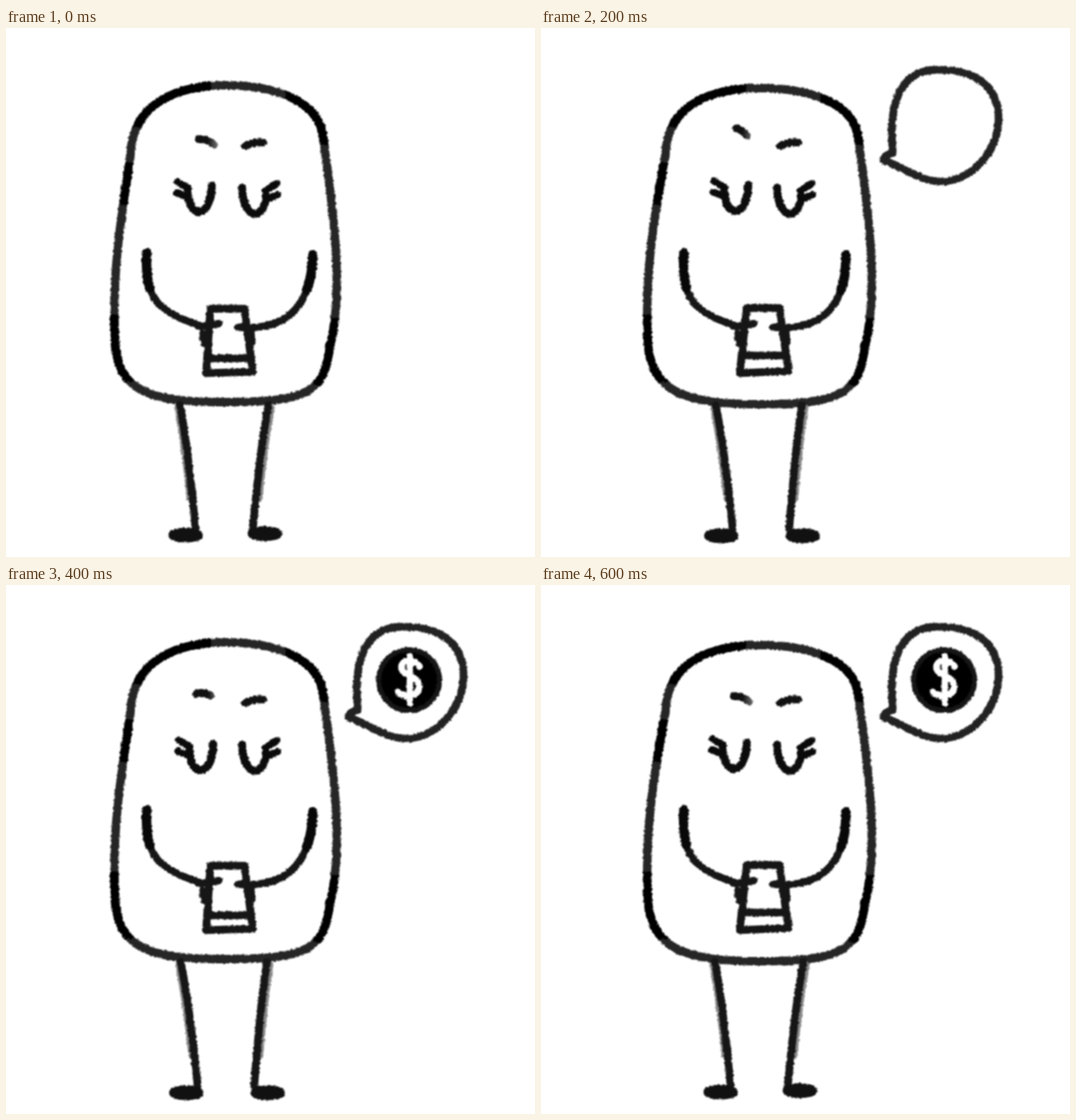
These frames come from a looping animation (748 by 748 pixels, 800 ms). An HTML page:

```html
<!DOCTYPE html>
<html lang="en">
<head>
<meta charset="utf-8">
<title>Reading the phone</title>
<style>
  html, body { margin: 0; width: 100%; height: 100%; overflow: hidden; background: #fff; }
  svg { display: block; width: 100vw; height: 100vh; }
  .ink { fill: none; stroke: #161616; stroke-width: 11; stroke-linecap: round; stroke-linejoin: round; }
  .pose { visibility: hidden; animation: 800ms step-end infinite; }
  .even { animation-name: even; }
  .odd { animation-name: odd; }
  .outer { animation-name: outer; }
  .inner { animation-name: inner; }
  .second { animation-name: second; }
  .third { animation-name: third; }
  .bubble { animation-name: bubble; }
  .coin { animation-name: coin; }
  @keyframes even { 0%, 50% { visibility: visible } 25%, 75%, 100% { visibility: hidden } }
  @keyframes odd { 0%, 50%, 100% { visibility: hidden } 25%, 75% { visibility: visible } }
  @keyframes outer { 0%, 75%, 100% { visibility: visible } 25%, 50% { visibility: hidden } }
  @keyframes inner { 0%, 75%, 100% { visibility: hidden } 25%, 50% { visibility: visible } }
  @keyframes second { 0%, 50%, 100% { visibility: hidden } 25% { visibility: visible } }
  @keyframes third { 0%, 75%, 100% { visibility: hidden } 50% { visibility: visible } }
  @keyframes bubble { 0% { visibility: hidden } 25%, 100% { visibility: visible } }
  @keyframes coin { 0% { visibility: hidden } 50%, 100% { visibility: visible } }
</style>
</head>
<body>
<svg viewBox="0 0 748 748">
  <defs>
    <filter id="rough" filterUnits="userSpaceOnUse" x="0" y="0" width="748" height="748" color-interpolation-filters="sRGB">
      <feTurbulence type="fractalNoise" baseFrequency=".28" numOctaves="2" seed="4" result="grain"/>
      <feDisplacementMap in="SourceGraphic" in2="grain" scale="4" xChannelSelector="R" yChannelSelector="G"/>
      <feGaussianBlur stdDeviation=".8"/>
    </filter>
    <clipPath id="dark">
      <path d="M182 60H290V140H165ZM395 60H480V165H395ZM435 410H490V505H435ZM135 405H185V500H135ZM150 190H195V250H150Z"/>
    </clipPath>
    <linearGradient id="fade" gradientUnits="userSpaceOnUse" x1="266" x2="302">
      <stop offset=".55" stop-color="#111"/>
      <stop offset="1" stop-color="#111" stop-opacity=".5"/>
    </linearGradient>
  </defs>
  <g id="stage" class="ink" filter="url(#rough)"></g>
</svg>
<script>
  const path = (d, attrs = '') => `<path d="${d}" ${attrs}/>`;
  const pose = (name, ...parts) => `<g class="pose ${name}">${parts.join('')}</g>`;

  // k is 0 for the tall stance and 1 for the squashed one
  function body(k) {
    const top = 81 + 4 * k, bottom = 529 + 3 * k, side = 154 - 3 * k;
    const d = `M310 ${top}C375 ${top} 445 ${top + 19} 449 158C459 235 480 365 458 450
      C450 515 428 ${bottom} 310 ${bottom}C210 ${bottom} ${side + 2} 518 ${side} 440
      C${side - 5} 335 ${side + 13} 245 176 180C178 105 245 ${top} 310 ${top}Z`;
    return path(d, 'stroke="#262626" stroke-width="12"') +
      path(d, 'stroke="#000" stroke-width="12" clip-path="url(#dark)"');
  }

  function arms(k) {
    const left = `M${199 + 3 * k} 318C${196 + 3 * k} 385 215 400 276 422L301 418`;
    const right = `M${434 - 3 * k} 321C432 380 408 430 328 423`;
    return [left, right].map(d => path(d, 'stroke-width="10.5"') +
      path(d, 'stroke="#080808" stroke-width="13.5" stroke-dasharray="50 999"')).join('') +
      path('M278 432L281 446M346 430L347 444');
  }

  const phone = k => path(`M${289 + 2 * k} ${397 - k}H337L${349 + k} ${486 - k}L${283 - 2 * k} 488Z
    M285 ${467 - 4 * k}H345`);

  function leg(x, toX, shade) {
    const d = `M${x} 533Q${(x + toX) / 2} 590 ${toX} 708`;
    return path(d, `stroke="#888" stroke-width="8" stroke-dasharray="130 999" transform="translate(${shade} 4)"`) + path(d);
  }

  const foot = (x, y) => `<ellipse cx="${x}" cy="${y}" rx="19" ry="5" fill="#000" stroke="#111"/>`;

  const eye = (dx, dy, flip = 1) => `<g transform="translate(${dx} ${dy}) scale(${flip} 1)">` +
    path('M291 223C290 270 259 270 257 233', 'stroke="#0c0c0c" stroke-width="11.5"') +
    path('M242 217L258 227M241 233L257 239', 'stroke="#0a0a0a" stroke-width="10"') + '</g>';

  const leftBrow = d => path(d, 'stroke="url(#fade)"');

  document.getElementById('stage').innerHTML =
    pose('even', body(0), arms(0), phone(0)) +
    pose('odd', body(1), arms(1), phone(1)) +
    pose('outer',
      leg(246, 268, -4), leg(371, 349, 5), foot(254, 717), foot(366, 715),
      leftBrow('M273 157Q286 157 294 165'), eye(0, 0)) +
    pose('inner',
      leg(247, 271, -4), leg(369, 351, 5), foot(255, 718), foot(370, 718)) +
    pose('second', leftBrow('M276 142Q285 145 291 152'), eye(2, -1)) +
    pose('third', leftBrow('M269 154Q280 151 289 156'), eye(2, 2)) +
    eye(625, 3, -1) +
    path('M338 167Q348 161 363 162', 'stroke="#111"') +
    pose('bubble',
      path(`M497 170C491 95 515 59 560 59C635 59 647 100 647 130C647 170 612 217 565 217
        C535 217 510 195 484 187Q486 179 497 177Z`, 'stroke="#222"')) +
    pose('coin',
      '<circle cx="570" cy="134.5" r="43" fill="#000" stroke="#161616" stroke-width="7"/>',
      path('M585 115C577 104 559 105 559 116C559 130 584 126 584 144C584 160 562 160 554 151M571 101V167',
        'stroke="#fff" stroke-width="9"'));
</script>
</body>
</html>
```
